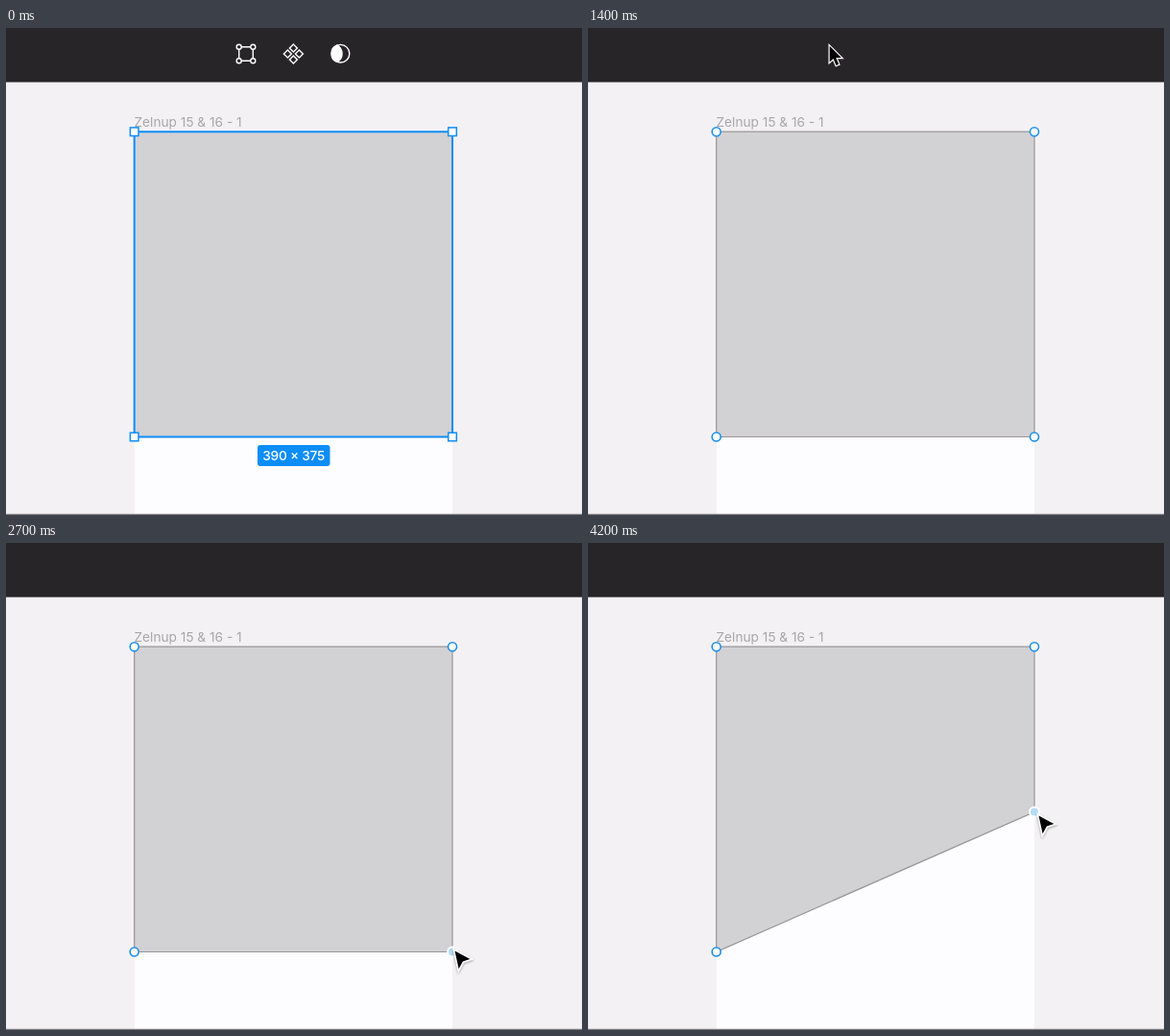
An HTML page for the animation above (4.8 s loop, 600 by 508 pixels).

```html
<!DOCTYPE html>
<html lang="en">
<head>
<meta charset="utf-8">
<title>Vector point edit</title>
<style>
  html, body { margin: 0; width: 100%; height: 100%; overflow: hidden; background: #f3f1f4; }
  svg { display: block; width: 600px; height: 508px; }
  text { font-family: Inter, "Liberation Sans", sans-serif; font-size: 13.7px; }
  .icons { fill: none; stroke: #fff; stroke-width: 1.4; }
  .squares rect { fill: #fff; stroke: #0d8df5; stroke-width: 1.5; }
  .dots circle { fill: #fff; stroke: #1b8fe6; stroke-width: 1.6; }
  .dots .active { fill: #b5dcf3; stroke: #fff; stroke-width: 2; }
  .cursor path { stroke: #fff; paint-order: stroke; }
  #arrow, #move { filter: drop-shadow(0 1px 1px rgba(0, 0, 0, .35)); }
</style>
</head>
<body>
<svg viewBox="0 0 600 508">
  <rect width="600" height="508" fill="#f3f1f4"/>
  <rect x="134" y="108" width="331" height="399" fill="#fdfcfe"/>
  <rect y="506.8" width="600" height="1.2" fill="#7d7b7f"/>
  <text x="133.5" y="103" fill="#a8a6a9">Zelnup 15 &amp; 16 - 1</text>

  <rect width="600" height="56.5" fill="#272528"/>
  <g id="tools">
    <rect id="hover" x="225" width="49.5" height="56.5" fill="#100e11"/>
    <g class="icons">
      <path d="M245 19.7h10M245 34.3h10M242.7 22v10M257.3 22v10"/>
      <g id="nodes"></g>
      <g id="diamonds"></g>
      <circle cx="348.5" cy="26.7" r="9.3"/>
      <path d="M345 18A9.3 9.3 0 0 0 345 35.4A10 10 0 0 0 345 18Z" fill="#fff"/>
    </g>
  </g>

  <path id="shape" fill="#d2d1d3"/>
  <g id="stripes" stroke="#1c8fea" stroke-width="1.9" clip-path="url(#area)"></g>
  <clipPath id="area"><rect x="134" y="108.5" width="331" height="318"/></clipPath>
  <path id="edge" fill="none"/>

  <g id="select">
    <g class="squares" id="squares"></g>
    <rect x="262" y="435" width="75.5" height="22" rx="3" fill="#0d8df8"/>
    <text x="299.7" y="451.2" fill="#fff" font-weight="500" text-anchor="middle" textLength="65">390 × 375</text>
  </g>
  <g class="dots" id="dots"></g>

  <g class="cursor" id="cursor">
    <path id="pointer" d="M.7 .8V17.6L4.6 14L7.5 21L10.2 19.8L7.3 13H12.9Z" fill="#000" stroke-width="2.4"/>
    <path id="arrow" d="M.5 .5L4.6 19.2L8.8 11.6L16.4 8.9Z" fill="#000" stroke-width="3.4"/>
    <path id="move" transform="translate(18.2 22.8)" stroke-width="2.6"
      d="M0-7.5L3-4.2H.8V-.8H4.2V-3L7.5 0L4.2 3V.8H.8V4.2H3L0 7.5L-3 4.2H-.8V.8H-4.2V3L-7.5 0L-4.2-3V-.8H-.8V-4.2H-3Z"/>
  </g>
</svg>
<script>
const LOOP = 4800, STEP = 100;
const LEFT = 133.7, RIGHT = 465, TOP = 108.2, BOTTOM = 426.5;
const $ = id => document.getElementById(id);
const show = (id, on) => { $(id).style.display = on ? '' : 'none'; };
const clamp = v => Math.min(1, Math.max(0, v));
const lerp = (a, b, k) => a + (b - a) * k;

function add(parent, tag, attrs) {
  const el = document.createElementNS('http://www.w3.org/2000/svg', tag);
  for (const key in attrs) el.setAttribute(key, attrs[key]);
  return $(parent).appendChild(el);
}

for (const cx of [242.7, 257.3])
  for (const cy of [19.7, 34.3]) add('nodes', 'circle', { cx, cy, r: 2.5 });
for (const [x, y] of [[0, -6], [6, 0], [0, 6], [-6, 0]])
  add('diamonds', 'path', { d: `M${299.4 + x} ${22.9 + y}l4 4l-4 4l-4-4z` });
for (let sum = 261; sum < RIGHT + BOTTOM; sum += 19.2)
  add('stripes', 'path', { d: `M${sum - 100} 100L${sum - 430} 430` });

const corners = [[LEFT, TOP], [RIGHT, TOP], [LEFT, BOTTOM], [RIGHT, BOTTOM]];
let dot;
for (const [x, y] of corners) {
  add('squares', 'rect', { x: x - 4.3, y: y - 4.3, width: 8.6, height: 8.6 });
  dot = add('dots', 'circle', { cx: x, cy: y, r: 4.5 });
}

const drag = t => 1 - (1 - clamp((t - 2700) / 1100)) ** 1.93;

function tipAt(t) {
  if (t < 1400) {
    const k = Math.exp((300 - t) / 95);
    return [251 + 49 * k, 17.5 + 57 * k * k];
  }
  if (t < 2200) {
    const u = clamp((t - 1400) / 500);
    return [lerp(251, 472, u ** 1.25), lerp(18, 427, u ** 0.95)];
  }
  if (t < 2300) return [469, 426];
  const k = drag(t);
  return [lerp(467, 469, clamp(k * 3)), lerp(425, 284, k)];
}

function render(t) {
  const editing = t >= 1400;
  const [x, y] = tipAt(t);
  const onCanvas = y > 57;
  // The point trails the cursor by one step.
  const cornerY = lerp(BOTTOM, 280.5, drag(t - STEP));
  const outline = `M${LEFT} ${TOP}H${RIGHT}V${cornerY}L${LEFT} ${BOTTOM}Z`;

  $('shape').setAttribute('d', outline);
  $('edge').setAttribute('d', outline);
  $('edge').setAttribute('stroke', editing ? '#979598' : '#0d8df5');
  $('edge').setAttribute('stroke-width', editing ? 1.2 : 2);
  dot.setAttribute('cy', cornerY);
  dot.setAttribute('class', t >= 2200 ? 'active' : '');
  dot.setAttribute('r', t >= 2200 ? 5 : 4.5);

  show('tools', !editing);
  show('hover', t >= 400);
  show('select', !editing);
  show('dots', editing);
  show('stripes', editing && y > TOP && t < 2000);
  show('cursor', t >= 300);
  show('pointer', !onCanvas);
  show('arrow', onCanvas);
  show('move', t >= 2800 && t < 4200);
  $('cursor').setAttribute('transform', `translate(${x} ${y})`);
}

const start = performance.now();
function tick() {
  const t = (performance.now() - start) % LOOP;
  render(Math.floor(t / STEP) * STEP);
  requestAnimationFrame(tick);
}
tick();
</script>
</body>
</html>
```
